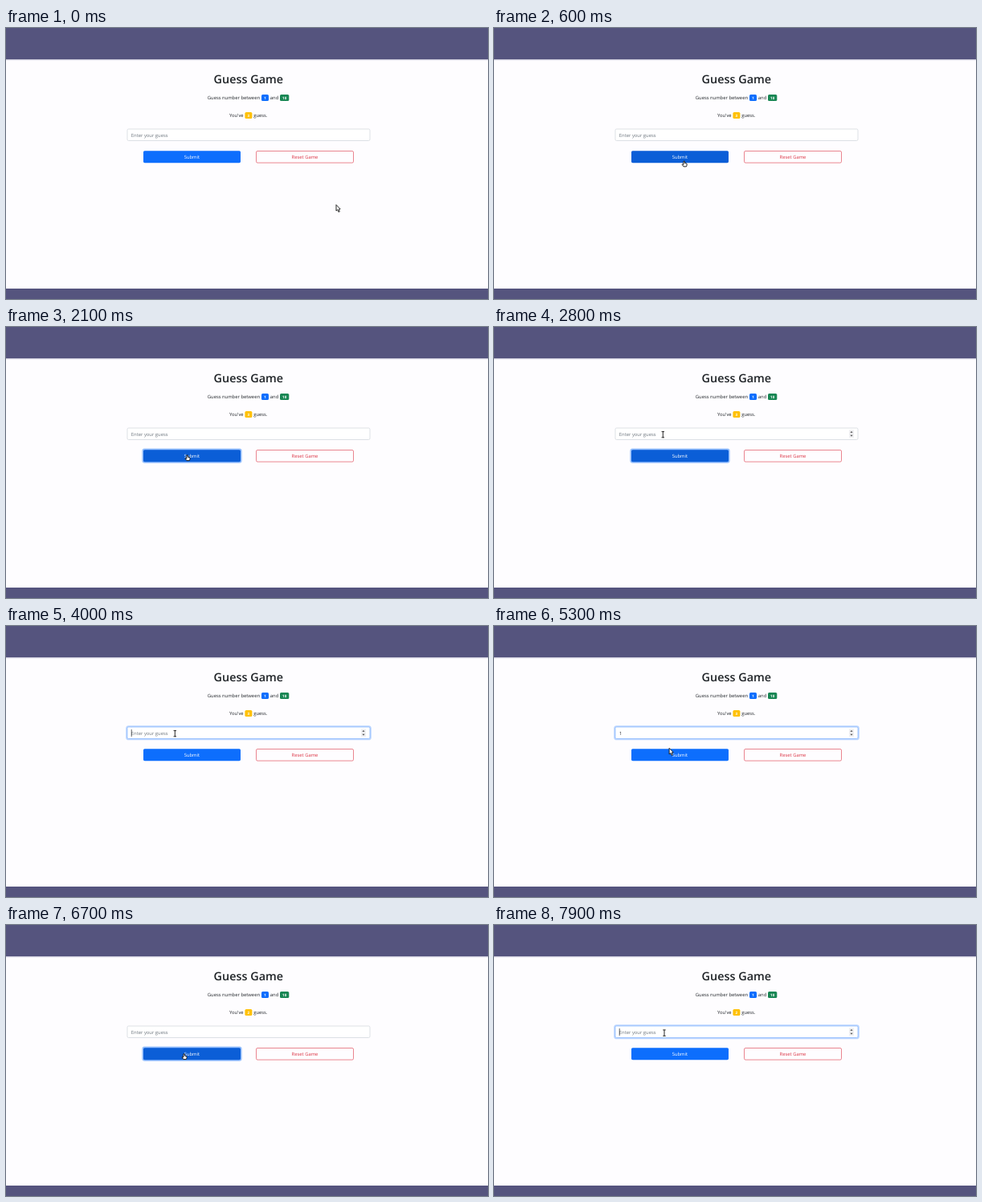
Recreate the animation shown at these times as an HTML page with a canvas. Size 600 by 338 pixels, loop 8 s.

```html
<!DOCTYPE html>
<html lang="en">
<head>
<meta charset="utf-8">
<title>Guess Game</title>
<style>
  html, body { margin: 0; width: 100%; height: 100%; overflow: hidden; background: #fefdff; }
  canvas { display: block; width: 600px; height: 338px; }
</style>
</head>
<body>
<canvas id="stage"></canvas>
<script>
const W = 600, H = 338, LOOP = 8000, STEP = 100;
const canvas = document.getElementById('stage');
const ctx = canvas.getContext('2d');
const dpr = window.devicePixelRatio || 1;
canvas.width = W * dpr;
canvas.height = H * dpr;

const FONT = '"Open Sans", "Noto Sans", sans-serif';
const BODY = 5.85;
const INPUT = { x: 151, y: 126, w: 302, h: 14.5 };
const SUBMIT = { x: 171, y: 153.2, w: 121, h: 15 };
const RESET = { x: 311.5, y: 153.5, w: 121, h: 14.6 };
const ALERT = { x: 151, y: 181.3, w: 302, h: 22.2 };

// Pointer keys: time, x, y
const PATH = [
  [0, 411, 220.5], [700, 227.6, 163],
  [1900, 227.6, 163], [2800, 210.3, 134],
  [4800, 210.3, 134], [5600, 221.6, 160.5],
  [6900, 221.6, 160.5], [7400, 212, 134.5], [LOOP, 212, 134.5]
];

const ramp = (t, a, b) => Math.min(1, Math.max(0, (t - a) / (b - a)));
const ease = p => (1 - Math.cos(Math.PI * p)) / 2;
const within = (t, a, b) => t >= a && t < b;
const inside = (p, r) => p.x >= r.x && p.x <= r.x + r.w && p.y >= r.y && p.y <= r.y + r.h;

function mix(a, b, p) {
  return 'rgb(' + a.map((v, i) => Math.round(v + (b[i] - v) * p)).join(',') + ')';
}

function pointerAt(t) {
  const i = PATH.findIndex((k, n) => n && t < k[0]);
  const [t0, x0, y0] = PATH[i - 1], [t1, x1, y1] = PATH[i];
  const p = ease((t - t0) / (t1 - t0));
  return { x: x0 + (x1 - x0) * p, y: y0 + (y1 - y0) * p };
}

function stateAt(t) {
  const pointer = pointerAt(t);
  const second = t >= 5700;
  return {
    pointer, second,
    overInput: inside(pointer, INPUT),
    overSubmit: inside(pointer, SUBMIT),
    inputFocus: t < 5600 ? ramp(t, 2800, 2900) : ramp(t, 7700, 7900),
    submitFocus: t < 2900 ? ramp(t, 900, 1100) : t < 7800 ? ramp(t, 5500, 5700) : 0,
    caret: within(t, 2900, 3400) || within(t, 4000, 4300) || within(t, 4400, 4900) ||
           within(t, 5400, 5600) || t >= 7800,
    value: within(t, 4300, 5700) ? '1' : '',
    alert: within(t, 1100, 2000) ? "Can't be empty!"
         : within(t, 5700, 6700) ? "You guessed it wrong! You've 2 guess." : ''
  };
}

function text(str, x, y, color, { size = BODY, weight = 400, align = 'left' } = {}) {
  ctx.font = `${weight} ${size}px ${FONT}`;
  ctx.textAlign = align;
  ctx.fillStyle = color;
  ctx.fillText(str, x, y);
}

function box({ x, y, w, h }, fill, stroke, grow = 0, line = 0.7) {
  ctx.beginPath();
  ctx.roundRect(x - grow, y - grow, w + 2 * grow, h + 2 * grow, 1.6 + grow);
  if (fill) {
    ctx.fillStyle = fill;
    ctx.fill();
  }
  if (stroke) {
    ctx.strokeStyle = stroke;
    ctx.lineWidth = line;
    ctx.stroke();
  }
}

function badge(str, x, y, w, color) {
  box({ x, y, w, h: 8 }, color);
  text(str, x + w / 2, y + 5.7, '#fff', { size: 4.5, weight: 700, align: 'center' });
}

function shape(points) {
  ctx.beginPath();
  points.forEach(([x, y]) => ctx.lineTo(x, y));
  ctx.closePath();
}

function drawPage() {
  ctx.fillStyle = '#fefdff';
  ctx.fillRect(0, 0, W, H);
  ctx.fillStyle = '#55547e';
  ctx.fillRect(0, 0, W, 39);
  ctx.fillRect(0, 325, W, 13);
  ctx.fillStyle = '#cfcedd';
  ctx.fillRect(0, 39, W, 1);
  ctx.fillStyle = '#f1f0f6';
  ctx.fillRect(0, 40, W, 1);

  text('Guess Game', 301.8, 68.7, '#212529', { size: 14.4, weight: 600, align: 'center' });
  text('Guess number between', 250.8, 88.9, '#212529');
  badge('1', 318, 83, 9, '#0d6efd');
  text('and', 328.8, 88.9, '#212529');
  badge('10', 341, 83, 11.3, '#198754');
}

function drawInput(s) {
  const f = s.inputFocus;
  if (f) box(INPUT, `rgba(13,110,253,${0.28 * f})`, null, 1.8);
  box(INPUT, '#fff', mix([206, 212, 218], [134, 183, 254], f));
  if (s.value) text(s.value, 156, 135.6, '#212529');
  else text('Enter your guess', 155.8, 135.6, '#6c757d');
  if (s.caret) {
    ctx.fillStyle = '#212529';
    ctx.fillRect(s.value ? 159.4 : 155.8, 129, 0.7, 9);
  }
  if (s.overInput || f) {
    ctx.fillStyle = '#efeff1';
    ctx.fillRect(442, 128.4, 6, 9.6);
    ctx.fillStyle = '#444';
    shape([[443.4, 131.7], [445, 130], [446.6, 131.7]]);
    ctx.fill();
    shape([[443.4, 134.8], [445, 136.5], [446.6, 134.8]]);
    ctx.fill();
  }
}

function drawButtons(s) {
  const f = s.submitFocus;
  if (f) box(SUBMIT, `rgba(49,132,253,${0.5 * f})`, null, 1.6);
  box(SUBMIT, mix([13, 110, 253], [11, 94, 215], s.overSubmit ? 1 : f));
  text('Submit', 231.4, 163.1, '#fff', { align: 'center' });
  box(RESET, null, '#dc3545', 0, 0.6);
  text('Reset Game', 372, 163.1, '#dc3545', { align: 'center' });
}

function outlined(fill = '#fff') {
  ctx.lineJoin = 'round';
  ctx.lineWidth = 0.9;
  ctx.strokeStyle = '#111';
  ctx.fillStyle = fill;
  ctx.fill();
  ctx.stroke();
}

function drawArrow() {
  shape([[0, 0], [0, 7.6], [1.7, 6.1], [3, 9], [4.3, 8.4], [3.1, 5.6], [5.2, 5.4]]);
  outlined();
}

function drawHand() {
  shape([[-0.7, 0.3], [0.7, 0.3], [0.8, 2.6], [3.2, 3.2], [3.5, 5], [2.8, 7],
         [-0.7, 7], [-2.5, 4.5], [-2, 3.8], [-0.7, 4.6]]);
  outlined();
}

function drawBeam() {
  ctx.strokeStyle = '#111';
  ctx.lineWidth = 0.9;
  ctx.beginPath();
  for (const y of [-3.6, 3.8]) {
    ctx.moveTo(-1.7, y);
    ctx.lineTo(1.7, y);
  }
  ctx.moveTo(0, -3.6);
  ctx.lineTo(0, 3.8);
  ctx.stroke();
}

function drawPointer(s) {
  ctx.save();
  ctx.translate(s.pointer.x, s.pointer.y);
  if (s.overInput) drawBeam();
  else if (s.overSubmit) drawHand();
  else drawArrow();
  ctx.restore();
}

function draw(t) {
  const s = stateAt(t);
  ctx.setTransform(dpr, 0, 0, dpr, 0, 0);
  ctx.textRendering = 'geometricPrecision';
  drawPage();
  text("You've", 278, 110.9, '#212529');
  badge(s.second ? '2' : '3', 297.4, 105, 9, '#ffc107');
  text('guess.', 308.2, 110.9, '#212529');
  drawInput(s);
  drawButtons(s);
  if (s.alert) {
    box(ALERT, '#f7d6d9', '#f2c0c5');
    text(s.alert, 301.7, 194.8, '#842029', { align: 'center' });
  }
  drawPointer(s);
}

const start = performance.now();
function tick() {
  const t = (performance.now() - start) % LOOP;
  draw(Math.floor(t / STEP) * STEP);
  requestAnimationFrame(tick);
}
tick();
</script>
</body>
</html>
```
